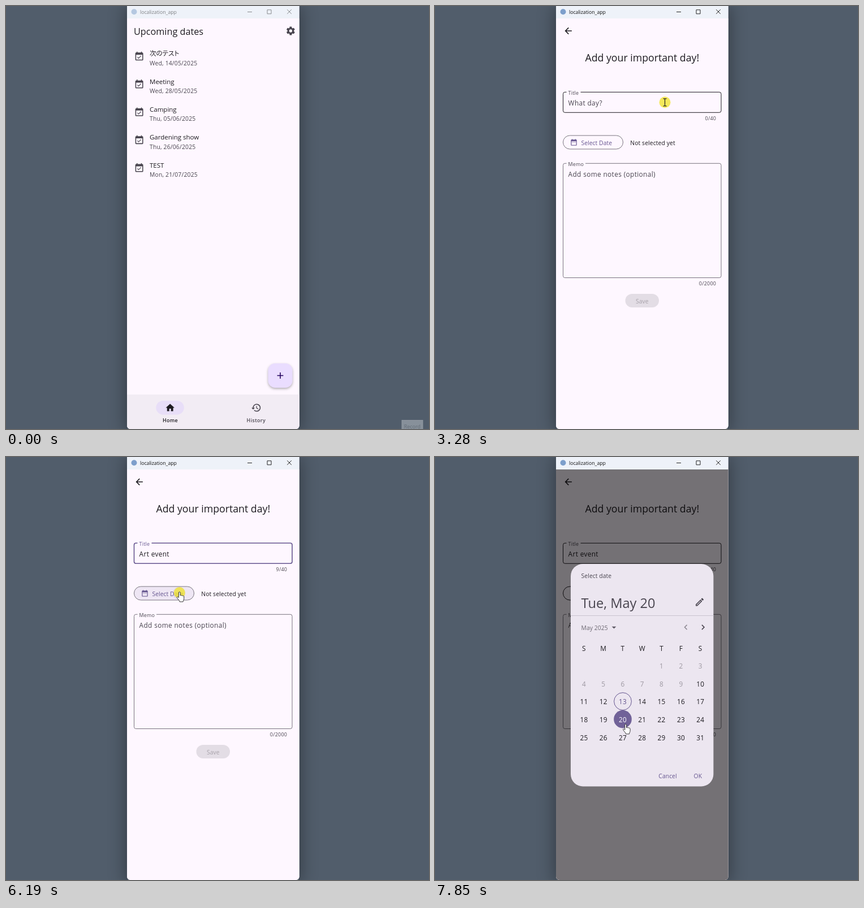
Recreate the animation shown at these times as an HTML page. Size 748 px wide and 748 px high, loop 8000 ms.

```html
<!DOCTYPE html>
<html lang="en">
<head>
<meta charset="utf-8">
<title>Upcoming dates</title>
<style>
html, body { margin: 0; width: 100%; height: 100%; overflow: hidden; background: #515d6b; }
svg { display: block; width: 100vw; height: 100vh; }
text { font-family: "Open Sans", "Noto Sans", "Noto Sans CJK JP", sans-serif; white-space: pre; }
.jp { font-family: "Noto Sans CJK JP", "Noto Sans CJK", sans-serif; font-feature-settings: "palt"; }
#shade { filter: drop-shadow(0 7px 16px rgba(0, 0, 0, .42)); }
#fab rect { filter: drop-shadow(0 2px 2px rgba(0, 0, 0, .3)); }
</style>
</head>
<body>
<svg id="stage" viewBox="0 0 748 748"></svg>
<script>
const LOOP = 8000;
const INK = '#1d1b20', SOFT = '#49454f', LINE = '#79747e', MAIN = '#65558f', PAGE = '#fef7ff';
const EM = 0.738, GAP = 0.773; // design units to stage pixels

// Text centred vertically on y; size and spacing in design units.
function label(x, y, str, size, o = {}) {
  const px = size * EM;
  return `<text x="${x}" y="${y + px * 0.37}" font-size="${px}" fill="${o.fill || INK}"
    font-weight="${o.weight || 400}" letter-spacing="${(o.gap || 0) * GAP}"
    text-anchor="${o.anchor || 'start'}" ${o.attr || ''}>${str}</text>`;
}

function icon(cx, cy, d, fill = SOFT, size = 18.55) {
  const k = size / 24;
  return `<path transform="translate(${cx - size / 2} ${cy - size / 2}) scale(${k})" d="${d}" fill="${fill}" fill-rule="evenodd"/>`;
}

const box = (x, y, w, h, r, attr) => `<rect x="${x}" y="${y}" width="${w}" height="${h}" rx="${r}" ${attr}/>`;

const ICON = {
  event: 'M16.53 11.06L15.47 10l-4.88 4.88-2.12-2.12-1.06 1.06L10.59 17zM19 3h-1V1h-2v2H8V1H6v2H5a2 2 0 0 0-2 2v14a2 2 0 0 0 2 2h14a2 2 0 0 0 2-2V5a2 2 0 0 0-2-2zm0 16H5V8h14z',
  range: 'M19 4h-1V2h-2v2H8V2H6v2H5a2 2 0 0 0-2 2v14a2 2 0 0 0 2 2h14a2 2 0 0 0 2-2V6a2 2 0 0 0-2-2zm0 16H5V9h14zM7 11h2v2H7zm4 0h2v2h-2zm4 0h2v2h-2z',
  home: 'M10 20v-6h4v6h5v-8h3L12 3 2 12h3v8z',
  history: 'M13 3a9 9 0 0 0-9 9H1l3.96 4.03L9 12H6a7 7 0 1 1 2.06 4.94l-1.42 1.42A9 9 0 1 0 13 3zm-1 5v5l4.28 2.54.72-1.21-3.5-2.08V8z',
  plus: 'M19 13h-6v6h-2v-6H5v-2h6V5h2v6h6z',
  back: 'M20 11H7.83l5.59-5.59L12 4l-8 8 8 8 1.41-1.41L7.83 13H20z',
  edit: 'M14.06 9.02l.92.92L5.92 19H5v-.92zM17.66 3c-.25 0-.51.1-.7.29l-1.83 1.83 3.75 3.75 1.83-1.83a1 1 0 0 0 0-1.41l-2.34-2.34c-.2-.2-.45-.29-.71-.29zm-3.6 3.19L3 17.25V21h3.75L17.81 9.94z',
  left: 'M15.41 7.41L14 6l-6 6 6 6 1.41-1.41L10.83 12z',
  right: 'M10 6L8.59 7.41 13.17 12l-4.58 4.59L10 18l6-6z',
  down: 'M7 10l5 5 5-5z'
};

function gear(cx, cy) {
  let teeth = '';
  for (let a = 0; a < 360; a += 60) teeth += `<rect x="-2" y="-7.5" width="4" height="4" rx=".6" transform="rotate(${a})"/>`;
  return `<g transform="translate(${cx} ${cy})" fill="${SOFT}">${teeth}<circle r="4.2" fill="none" stroke="${SOFT}" stroke-width="3.1"/></g>`;
}

function titleBar() {
  return `<rect x="214" y="-8" width="304.6" height="30.5" fill="#eef2f9"/>
  <g id="chrome"><circle cx="226.5" cy="10.3" r="5" fill="#7d9fcb"/>
  ${label(237, 10.4, 'localization_app', 11.8, { fill: '#111' })}
  <path d="M427 10.5h8M462 6.8h7v7h-7zM497.2 6.3l7.6 7.6m0-7.6l-7.6 7.6" fill="none" stroke="#222"/></g>`;
}

function homePage() {
  const rows = [['次のテスト', 'Wed, 14/05/2025'], ['Meeting', 'Wed, 28/05/2025'], ['Camping', 'Thu, 05/06/2025'],
    ['Gardening show', 'Thu, 26/06/2025'], ['TEST', 'Mon, 21/07/2025']];
  const list = rows.map(([name, date], i) => {
    const y = 49.3 * i;
    return icon(235.6, 89.3 + y, ICON.event) +
      label(254, 84.2 + y, name, 15.6, { weight: 500, attr: i ? '' : 'class="jp"' }) +
      label(254, 101 + y, date, 14, { fill: SOFT, gap: 0.25 });
  }).join('');
  return box(214, 22, 305, 726, 0, `fill="${PAGE}"`) +
    label(226, 45, 'Upcoming dates', 22) + gear(503.4, 44) + list +
    box(214, 687, 305, 61, 0, 'fill="#f2ecf4"') +
    box(265.3, 698, 49.5, 24.7, 12.4, 'fill="#e8def8"') +
    icon(290.2, 710.4, ICON.home, INK) + icon(442.5, 710.4, ICON.history) +
    label(290.5, 732.5, 'Home', 12, { weight: 600, gap: 0.5, anchor: 'middle' }) +
    label(442.4, 732.5, 'History', 12, { weight: 600, gap: 0.5, anchor: 'middle', fill: SOFT }) +
    `<g id="fab">${box(463.5, 632, 43, 43, 12.4, 'fill="#eaddff"')}</g>` + icon(485, 653.5, ICON.plus, '#21005d');
}

function field(y, h, name, gap, id) {
  return box(226.5, y, 279.5, h, 3.2, `id="${id}Box" fill="none" stroke="${LINE}"`) +
    box(232.5, y - 3, gap, 6, 0, `fill="${PAGE}"`) +
    label(235.6, y + 1, name, 12, { fill: SOFT, gap: 0.3, attr: `id="${id}Label"` });
}

function formPage() {
  const pale = { fill: SOFT, gap: 0.5 };
  const count = { fill: SOFT, gap: 0.4, anchor: 'end' };
  return box(214, 22, 305, 726, 0, `fill="${PAGE}"`) +
    icon(235.7, 44, ICON.back, INK) +
    label(366.3, 91.5, 'Add your important day!', 24, { anchor: 'middle' }) +
    field(152.3, 36, 'Title', 25, 'title') +
    label(235.6, 171.2, 'What day?', 16, { ...pale, attr: 'id="hint"' }) +
    label(235.6, 171.2, '', 16, { gap: 0.5, attr: 'id="typed"' }) +
    box(0, 161.5, 1.5, 17, 0.6, `id="caret" fill="${MAIN}"`) +
    label(497.2, 198.5, '0/40', 12, { ...count, attr: 'id="count"' }) +
    box(226.5, 229, 106, 24, 12, `id="pick" fill="${MAIN}" fill-opacity="0" stroke="${LINE}"`) +
    `<circle id="ripple" cx="306" cy="241" r="11" fill="${MAIN}" opacity=".1"/>` +
    icon(245.5, 241, ICON.range, MAIN, 13.9) +
    label(258.4, 242, 'Select Date', 14, { weight: 500, gap: 0.1, fill: MAIN }) +
    label(345.3, 242, 'Not selected yet', 14, { weight: 500, gap: 0.15 }) +
    field(278.3, 202.2, 'Memo', 33.5, 'memo') +
    label(235.6, 297.7, 'Add some notes (optional)', 16, pale) +
    label(497.2, 491, '0/2000', 12, count) +
    box(336.5, 509, 59.5, 24, 12, 'fill="#e3dde5"') +
    label(366.3, 522, 'Save', 14, { weight: 500, gap: 0.1, anchor: 'middle', fill: '#a8a2aa' });
}

const dayX = col => 263.4 + 34.3 * col;
const dayY = row => 370 + 31.55 * row;

function dialog() {
  let days = '';
  const mid = { anchor: 'middle', gap: 0.3 };
  [...'SMTWTFS'].forEach((d, i) => { days += label(dayX(i), 338.6, d, 16, mid); });
  for (let d = 1; d <= 31; d++) {
    const cell = d + 3;
    days += label(dayX(cell % 7), dayY(Math.floor(cell / 7)), d, 16,
      { ...mid, fill: d < 10 ? '#9d98a1' : d === 13 ? MAIN : INK, attr: `id="day${d}"` });
  }
  return box(240, 189, 252.4, 393.5, 21.6, 'fill="#ece6f0"') +
    label(258.6, 210, 'Select date', 14, { weight: 500, gap: 0.1, fill: SOFT }) +
    label(258.6, 258, '', 32, { fill: SOFT, attr: 'id="headline"' }) +
    icon(468, 256.5, ICON.edit) +
    '<path d="M240 280.5h252.4" stroke="#cac4d0"/>' +
    label(258.6, 301.8, 'May 2025', 14, { weight: 500, gap: 0.1, fill: '#6c6771' }) +
    icon(316.5, 301.2, ICON.down, '#5d5863') + icon(443.5, 301, ICON.left, '#8f8a94') + icon(474, 301, ICON.right) +
    `<circle id="chosen" r="15.8" fill="${MAIN}"/><circle id="over" r="15.8"/>` +
    `<circle cx="${dayX(2)}" cy="${dayY(2) - 1}" r="15.4" fill="none" stroke="${MAIN}"/>` + days +
    label(411.5, 564, 'Cancel', 14, { weight: 500, gap: 0.1, anchor: 'middle', fill: MAIN }) +
    label(464.8, 564, 'OK', 14, { weight: 500, gap: 0.1, anchor: 'middle', fill: MAIN });
}

const pointers = `<g id="mouse" stroke-linejoin="round">
  <path id="arrow" d="M0 0v13l3-2.8 2 4.8 2.3-1-2-4.6h4.2z" fill="#fff" stroke="#222" stroke-width=".9"/>
  <path id="beam" d="M-3-6.5h2.2L0-5.8.8-6.5H3M0-5.8V5.8M-3 6.5h2.2L0 5.8l.8.7H3" fill="none" stroke="#222" stroke-width="1.2"/>
  <path id="hand" transform="translate(-4.9 0)" d="M3.5 1.5a1.4 1.4 0 0 1 2.8 0v5c.3-.9 2.2-.8 2.3.3.4-.8 2-.6 2.2.4.6-.6 2-.3 2 1V12c0 2-1.4 3-1.6 5.5H5.2C5 15 1.5 12.5.4 10c-.4-1.2 1-2 2-1l1.1 1.2z" fill="#fff" stroke="#222" stroke-width=".9"/>
</g>`;

const stage = document.getElementById('stage');
stage.innerHTML = `<defs><clipPath id="frame"><rect x="214" y="-8" width="304.6" height="756" rx="6"/></clipPath>
  <clipPath id="body"><rect x="214" y="22" width="305" height="726"/></clipPath></defs>
  <rect width="748" height="748" fill="#515d6b"/>
  <g id="record"><rect x="700" y="732.5" width="37" height="16" fill="#87909a" stroke="#98a0a8" stroke-width=".8"/>
  ${label(718.4, 743.4, 'Record', 12.2, { fill: '#626c77', anchor: 'middle' })}</g>
  <rect id="shade" x="214" y="-8" width="304.6" height="756" rx="6" fill="${PAGE}"/>
  <g clip-path="url(#frame)">${titleBar()}<g clip-path="url(#body)">
    <g id="home">${homePage()}</g><g id="form">${formPage()}</g>
    <rect id="barrier" x="214" y="22" width="305" height="726"/><g id="dialog">${dialog()}</g>
  </g></g>
  <circle id="click" r="10" fill="#f2e62e" opacity=".78"/>${pointers}`;

const el = {};
stage.querySelectorAll('[id]').forEach(n => { el[n.id] = n; });
const show = (id, on) => { el[id].style.display = on ? '' : 'none'; };
const set = (id, attrs) => { for (const k in attrs) el[id].setAttribute(k, attrs[k]); };
const within = (t, a, b) => t >= a && t < b;

// Progress in n even jumps: the first lands at a, the last at b.
function jumps(t, a, b, n) {
  if (t < a) return 0;
  if (t >= b) return 1;
  return Math.floor((t - a) / (b - a) * (n - 1) + 1) / n;
}
const ease = u => u * u * (3 - 2 * u);
const curve = (p, c, q, u) => [0, 1].map(i => (1 - u) ** 2 * p[i] + 2 * u * (1 - u) * c[i] + u * u * q[i]);

const CORNER = [723, 735], ADD = [477.5, 643], TITLE = [406.5, 170.3], PICK = [306.8, 238.5], DAY = [338, 473.5];

function mouseAt(t) {
  if (t < 630) return [710, 734];
  if (t < 2500) return curve(CORNER, [560, 690], ADD, ease(jumps(t, 1220, 1660, 6)));
  if (t < 5870) return curve(ADD, [640, 205], TITLE, ease(jumps(t, 2500, 2960, 7)));
  if (t < 6520) return curve(TITLE, [350, 185], PICK, ease(jumps(t, 5870, 6110, 4)));
  if (t < 7380) return curve(PICK, [385, 430], DAY, ease(jumps(t, 6520, 6820, 5)));
  return [337.2, 472.3];
}

const KEYS = [[4000, 1], [4080, 2], [4240, 3], [4310, 4], [5010, 5], [5160, 6], [5240, 8], [5380, 9]];
const BLINKS = [3360, 3530, 3770, 4550, 4790, 5640, 5870, 6110];

function drawForm(t, x, y) {
  const n = KEYS.reduce((v, [at, c]) => t >= at ? c : v, 0);
  const focus = within(t, 3360, 6270);
  el.typed.textContent = 'Art event'.slice(0, n);
  el.count.textContent = n + '/40';
  show('hint', n === 0);
  const overField = t > 2500 && t < 6270 && within(x, 226, 506) && within(y, 152, 188);
  set('titleBox', { stroke: focus ? MAIN : overField || t >= 6270 ? INK : LINE, 'stroke-width': focus ? 1.6 : 1 });
  set('titleLabel', { fill: focus ? MAIN : SOFT });
  show('caret', BLINKS.filter(b => t >= b).length % 2);
  set('caret', { x: 235.4 + (n ? el.typed.getComputedTextLength() : 0) });
  const overPick = within(t, 5870, 6350) && within(x, 226, 333) && within(y, 229, 253);
  set('pick', { 'fill-opacity': overPick ? 0.1 : 0, stroke: t >= 6270 ? INK : LINE });
  show('ripple', within(t, 6190, 6270));
  return { overField, overPick };
}

function drawDialog(t, x, y) {
  const open = t >= 6270, full = t >= 6350, picked = t >= 7780;
  show('barrier', open);
  show('dialog', open);
  set('barrier', { opacity: full ? 0.54 : 0.394 });
  set('dialog', { opacity: full ? 1 : 0.61 });
  el.headline.textContent = picked ? 'Tue, May 20' : 'Wed, May 14';
  const sel = picked ? 20 : 14, cell = sel + 3;
  set('chosen', { cx: dayX(cell % 7), cy: dayY(Math.floor(cell / 7)) - 1 });
  [14, 20].forEach(d => set('day' + d, { fill: d === sel ? '#fff' : INK }));
  const col = Math.round((x - dayX(0)) / 34.3), row = Math.round((y - dayY(0)) / 31.55), day = row * 7 + col - 3;
  const over = t >= 6520 && day > 9 && day < 32 && col >= 0 && col < 7;
  show('over', over);
  set('over', { cx: dayX(col), cy: dayY(row) - 1, fill: day === sel ? '#fff' : MAIN, opacity: 0.08 });
  return over;
}

function render(t) {
  const [x, y] = mouseAt(t);
  show('record', t < 70);
  set('chrome', { opacity: t < 1870 ? 0.5 : 1 });

  const p = jumps(t, 1950, 2350, 6), e = 1 - (1 - p) ** 3;
  show('home', p < 1);
  show('form', p > 0);
  const zoom = k => `translate(366.3 385) scale(${k}) translate(-366.3 -385)`;
  set('home', { transform: zoom(1 + 0.05 * e) });
  set('form', { transform: zoom(0.85 + 0.15 * e), opacity: Math.min(1, p * 2.5) });

  const { overField, overPick } = drawForm(t, x, y);
  const overDay = drawDialog(t, x, y);
  const overAdd = t < 1950 && within(x, 463, 507) && within(y, 632, 675);
  const hand = overAdd || overDay || (overPick && t < 6270);
  show('mouse', t >= 550);
  set('mouse', { transform: `translate(${x} ${y})` });
  show('hand', hand);
  show('beam', overField);
  show('arrow', !hand && !overField);
  show('click', within(t, 1870, 1950) || within(t, 3280, 3360) || within(t, 6190, 6270));
  set('click', { cx: x, cy: y + (overField ? 0 : 1.5) });
}

const start = performance.now();
function tick() {
  render((performance.now() - start) % LOOP);
  requestAnimationFrame(tick);
}
tick();
</script>
</body>
</html>
```
